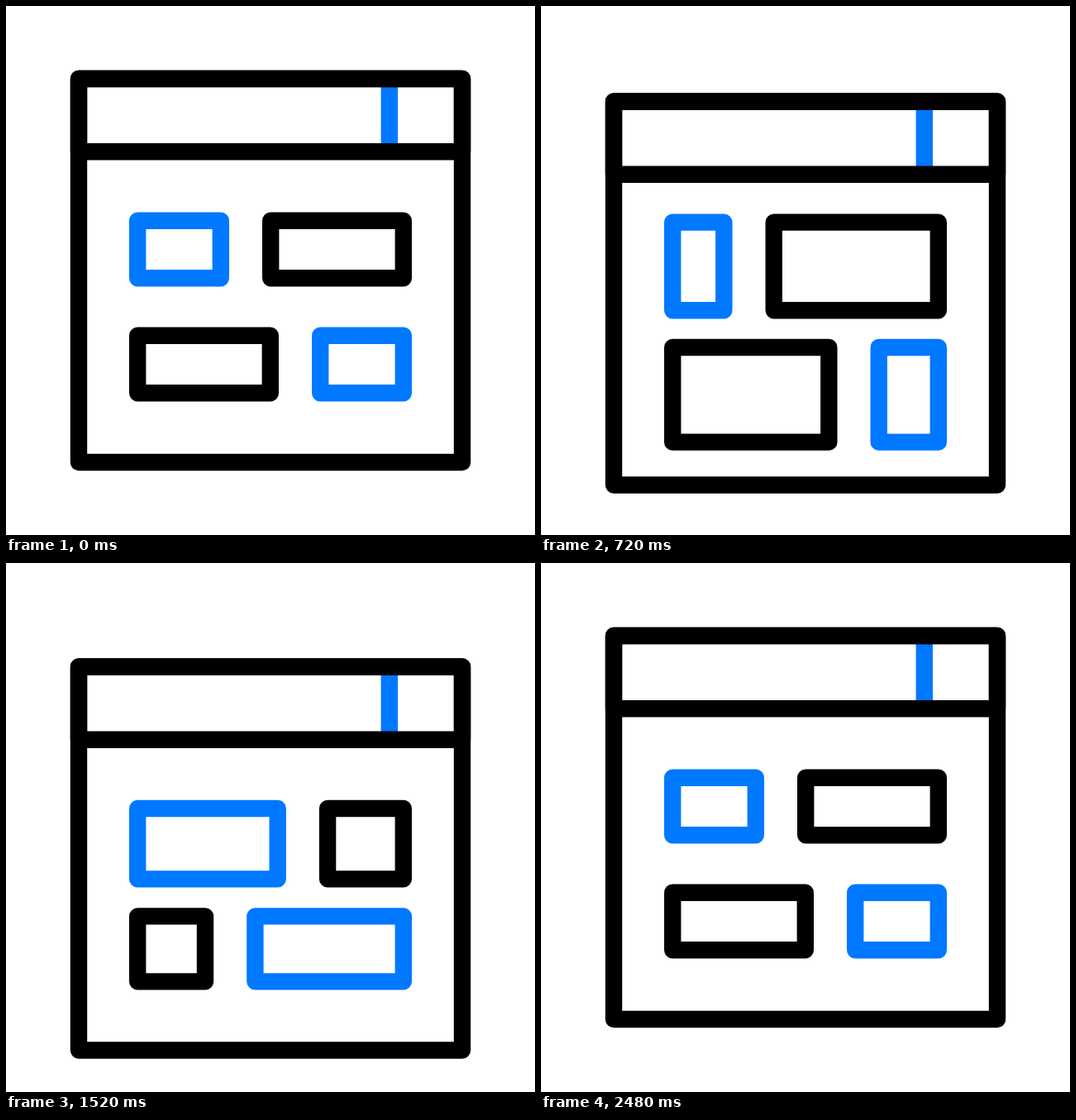
These frames come from a looping animation (640x640 px, 2.52 s). An HTML page with a canvas:

```html
<!DOCTYPE html>
<html lang="en">
<head>
<meta charset="utf-8">
<title>Window layout</title>
<style>
  html, body { margin: 0; width: 100%; height: 100%; overflow: hidden; background: #fff; }
  canvas { display: block; width: 640px; height: 640px; }
</style>
</head>
<body>
<canvas id="stage" width="640" height="640"></canvas>
<script>
const ctx = document.getElementById('stage').getContext('2d');
const LOOP = 2520, STEP = 40;
const BLACK = '#000', BLUE = '#0078ff';
const LINE = 20.4, GAP = 40, LEFT = 149, RIGHT = 491;

// Vertical travel of the whole window
const drift = [
  { at: 40, pose: [0] },
  { at: 1240, pose: [40.8] },
  { at: 2320, pose: [0] }
];

// Two rows: right edge of the left box, top, bottom
const layout = [
  { at: 60, pose: [270, 249.5, 339.5, 330, 388.5, 478.5] },
  { at: 790, pose: [231, 223.6, 351.1, 358.9, 375.2, 510.8] },
  { at: 1590, pose: [340.1, 249.6, 355.1, 250, 379.7, 478.7] },
  { at: 2460, pose: [270, 249.5, 339.5, 330, 388.5, 478.5] }
];

// Symmetric cubic ease with handles (a, 0) and (1 - a, 1)
function ease(x, a) {
  let lo = 0, hi = 1;
  for (let i = 0; i < 24; i++) {
    const s = (lo + hi) / 2;
    const sx = s * s * (3 - 2 * s) + 3 * a * s * (1 - s) * (1 - 2 * s);
    if (sx < x) lo = s; else hi = s;
  }
  return lo * lo * (3 - 2 * lo);
}

function poseAt(keys, t, a) {
  if (t <= keys[0].at) return keys[0].pose;
  const i = keys.findIndex(k => k.at > t);
  if (i < 0) return keys[keys.length - 1].pose;
  const from = keys[i - 1], to = keys[i];
  const p = ease((t - from.at) / (to.at - from.at), a);
  return from.pose.map((v, n) => v + (to.pose[n] - v) * p);
}

// Outlined box given by its outer edges
function box(x1, y1, x2, y2, color) {
  const h = LINE / 2;
  ctx.strokeStyle = color;
  ctx.strokeRect(x1 + h, y1 + h, x2 - x1 - LINE, y2 - y1 - LINE);
}

function row(split, top, bottom, leftColor, rightColor) {
  box(LEFT, top, split, bottom, leftColor);
  box(split + GAP, top, RIGHT, bottom, rightColor);
}

function draw(t) {
  const [dy] = poseAt(drift, t, 0.64);
  const [split1, top1, bottom1, split2, top2, bottom2] = poseAt(layout, t, 0.5);
  ctx.fillStyle = '#fff';
  ctx.fillRect(0, 0, 640, 640);
  ctx.save();
  ctx.translate(0, dy);
  ctx.lineWidth = LINE;
  ctx.lineJoin = 'round';
  ctx.fillStyle = BLUE;
  ctx.fillRect(453.6, 90, LINE, 84);
  box(77.8, 77.8, 562.2, 562.2, BLACK);
  box(77.8, 77.8, 562.2, 186.4, BLACK);
  row(split1, top1, bottom1, BLUE, BLACK);
  row(split2, top2, bottom2, BLACK, BLUE);
  ctx.restore();
}

const start = performance.now();
function tick() {
  const t = (performance.now() - start) % LOOP;
  draw(Math.floor(t / STEP) * STEP);
  requestAnimationFrame(tick);
}
tick();
</script>
</body>
</html>
```
